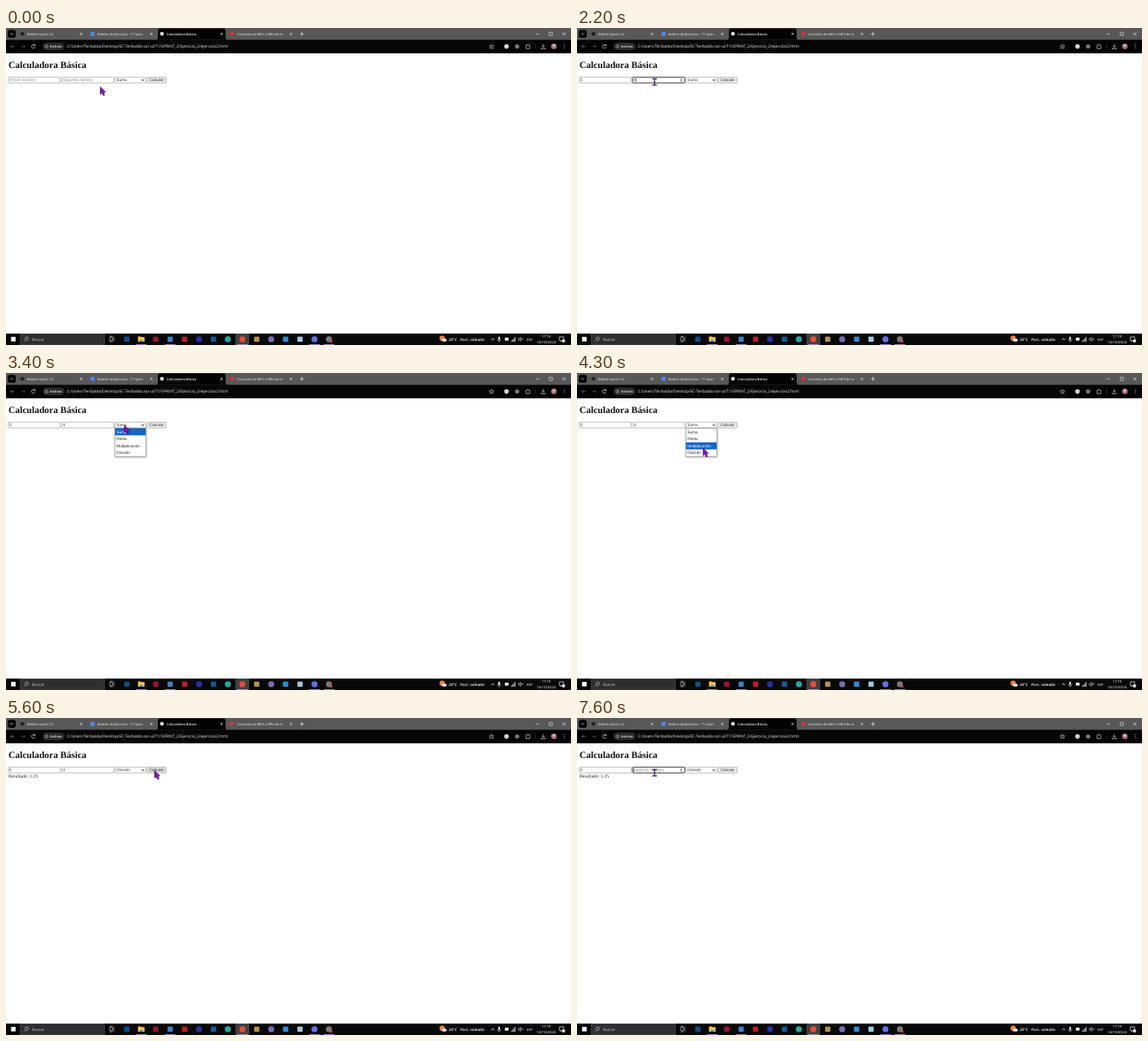
An HTML page for the animation above (8 s loop, 692 px wide and 388 px high).

```html
<!DOCTYPE html>
<html lang="es">
<head>
<meta charset="utf-8">
<title>Calculadora Básica</title>
<style>
  html, body { margin: 0; width: 100%; height: 100%; overflow: hidden; background: #fff; }
  svg { display: block; width: 692px; height: 388px; text-rendering: geometricPrecision; }
  .ui { font-family: "Open Sans", sans-serif; font-weight: 500; }
  .form { font-family: "Liberation Sans", Arial, sans-serif; font-size: 4.8px; }
  .page { font-family: "Liberation Serif", "Times New Roman", serif; }
</style>
</head>
<body>
<svg id="stage" viewBox="0 0 692 388"></svg>
<script>
const LOOP = 8000;
const rect = (x, y, w, h, fill, extra = '') =>
  `<rect x="${x}" y="${y}" width="${w}" height="${h}" fill="${fill}" ${extra}/>`;
const circle = (x, y, r, fill, extra = '') =>
  `<circle cx="${x}" cy="${y}" r="${r}" fill="${fill}" ${extra}/>`;
const line = (d, color = '#ddd', width = 0.7) =>
  `<path d="${d}" fill="none" stroke="${color}" stroke-width="${width}"/>`;
const text = (x, y, size, fill, content, extra = '') =>
  `<text x="${x}" y="${y}" font-size="${size}" fill="${fill}" ${extra}>${content}</text>`;
const cross = (x, y, r) => line(`M${x - r} ${y - r}l${2 * r} ${2 * r}m0 ${-2 * r}l${-2 * r} ${2 * r}`, '#eee');

function browserBar() {
  const tabs = [
    [26, 'Boletín Sprint 3.2', '#222', 92],
    [112, 'Boletín de Ejercicios - T1 Sprin', '#4c8bf5', 178],
    [197, 'Calculadora Básica', '#d8d8d8', 264],
    [283, 'Convierta de MKV a MP4 de m', '#e5303c', 349],
  ];
  const tabMarkup = tabs.map(([x, label, color, close], i) =>
    (i === 1 ? rect(x - 8.4, 4.7, 4.8, 4.8, color, 'rx=".6"') : circle(x - 6, 7.1, 2.4, color)) +
    text(x, 8.7, 4, '#f4f4f4', label, i === 2 ? 'font-weight="600"' : '') + cross(close, 7.2, 1.4)).join('');
  return `<g class="ui">
    ${rect(0, 0, 692, 15, '#585858')}${rect(0, 14.5, 692, 16.5, '#020202')}
    <path d="M183 14.6Q186 14.6 186 11.5V3Q186 .5 189 .5H266Q269 .5 269 3V11.5Q269 14.6 272 14.6Z" fill="#020202"/>
    ${rect(2, 2.3, 10, 9.7, '#050505', 'rx="3"')}${line('M5.4 6.3l1.6 1.6l1.6-1.6')}
    ${tabMarkup}
    ${line('M359.9 7.2h5m-2.5-2.5v5', '#eee')}${line('M649 7.2h4M665.3 5.2h3.8v3.8h-3.8z', '#eee', 0.6)}${cross(683.3, 7.2, 1.8)}
    ${line('M10.5 22.6H5.8m2.2-2.2l-2.2 2.2l2.2 2.2', '#777')}${line('M18.5 22.6h4.7m-2.2-2.2l2.2 2.2l-2.2 2.2', '#555')}
    ${line('M35.4 21.3a2.2 2.2 0 1 0 .2 2M35.7 19.8v1.8h-1.8')}
    ${rect(42, 16.6, 561, 12, '#060606', 'rx="6"')}${rect(45, 18, 26.5, 9.2, '#2b2b2b', 'rx="4.6"')}
    ${circle(49.6, 22.6, 1.8, 'none', 'stroke="#ddd" stroke-width=".5"')}${line('M49.6 22.2v1.3M49.6 21.3v.4', '#ddd', 0.5)}
    ${text(53.7, 24.1, 4.1, '#f4f4f4', 'Archivo', 'font-weight="600"')}
    ${text(74.4, 24.3, 4.86, '#f4f4f4', 'C:/Users/Teribaldo/Desktop/EC-Teribaldo.sor-ul/T1/SPRINT_2/Ejercicio_2/ejercicio2.html')}
    ${line('M594.6 19.9l.8 1.9 2 .1-1.5 1.3.5 2-1.8-1.1-1.8 1.1.5-2-1.5-1.3 2-.1z', '#ddd', 0.6)}
    ${circle(613, 22.6, 2.8, '#d2d2d2')}${circle(626, 22.6, 2.7, '#777')}
    ${line('M637 21h1.2a1 1 0 0 1 2 0h1.2v1.4a1 1 0 0 1 0 1.8v1h-4.4z')}
    ${line('M648.5 20v5.4', '#444', 0.5)}
    ${line('M658 19.6v4m-1.7-1.6l1.7 1.7l1.7-1.7M655.5 24.2v1.2h5v-1.2')}
    ${circle(671, 22.4, 3.4, '#a8727e')}${circle(671, 21.5, 1.4, '#e6bdb8')}
    ${[20.6, 22.6, 24.6].map(y => circle(684, y, 0.5, '#ddd')).join('')}
  </g>`;
}

function taskbar() {
  const apps = [
    ['#0b4f86', 'square'], ['#f4c65a', 'folder'], ['#a01238', 'square'], ['#3b82c4', 'square'],
    ['#c01c26', 'square'], ['#2b2f9e', 'circle'], ['#125c96', 'square'], ['#25a8a0', 'circle'],
    ['#e0503c', 'circle'], ['#b99049', 'square'], ['#7a6bb0', 'circle'], ['#2d8ed8', 'square'],
    ['#9bcbe0', 'square'], ['#6470e8', 'circle'], ['#77777b', 'circle'],
  ];
  const running = [1, 3, 8, 13, 14];
  const appMarkup = apps.map(([color, shape], i) => {
    const x = 148 + i * 17.68;
    const icon = shape === 'circle' ? circle(x, 380.9, 3.7, color)
      : shape === 'folder' ? rect(x - 4, 377.4, 3.5, 2, '#d99a2a') + rect(x - 4, 378.3, 8, 5.7, color) + rect(x - 2, 381.8, 4, 2.2, '#3e91d4')
      : rect(x - 3.2, 377.7, 6.4, 6.4, color, 'rx=".8"');
    return (i === 8 ? rect(x - 8.5, 374, 17, 14, '#404040') : '') + icon +
      (running.includes(i) ? rect(x - 6.5, 387.1, 13, 0.9, '#b58fd0') : '');
  }).join('');
  return `<g class="ui">
    ${rect(0, 374, 692, 14, '#080808')}${rect(17.2, 374.3, 103.6, 13.5, '#2f2f2f', 'stroke="#5a5a5a" stroke-width=".5"')}
    ${rect(6.2, 378, 5.6, 5.6, '#f4f4f4')}
    ${circle(25.5, 380.2, 2, 'none', 'stroke="#ddd" stroke-width=".6"')}${line('M24 381.7l-2 2', '#ddd', 0.6)}
    ${text(32, 382.7, 4.8, '#ccc', 'Buscar')}
    ${line('M127 378.8h3.4v3.8H127zM132 377.8v6M126.8 377.4h3.8M126.8 384h3.8', '#ddd', 0.6)}
    ${appMarkup}${circle(398.3, 383.5, 1.6, '#e33b3b')}
    ${circle(534.2, 379.8, 3.2, '#f0803a')}${rect(533.8, 380.3, 6, 3.5, '#e6e6ea', 'rx="1.7"')}
    ${text(542.2, 382.7, 4.7, '#fff', '24°C', 'font-weight="600"')}
    ${text(556.3, 382.7, 4.6, '#fff', 'Parc. soleado', 'font-weight="600"')}
    ${line('M594.2 382l1.9-1.9l1.9 1.9', '#eee', 0.8)}
    ${rect(603, 377.7, 2, 4, '#eee', 'rx="1"')}${line('M602 381a2 2 0 0 0 4 0M604 383v1.3', '#eee', 0.6)}
    ${rect(611, 379, 4.5, 3.6, '#eee')}${line('M619.5 384v-1.5m1.3 1.5v-3m1.3 3v-4.4m1.3 4.4v-5.8', '#eee', 0.8)}
    ${line('M627.7 380h1.2l1.4-1.4v4.8l-1.4-1.4h-1.2zM631.4 379.8l2 2m0-2l-2 2', '#eee', 0.6)}
    ${text(637.5, 382.6, 4.2, '#fff', 'ESP')}
    ${text(661.5, 379.3, 4.4, '#fff', '17:19', 'text-anchor="middle"')}
    ${text(661.5, 386.2, 4.4, '#fff', '14/10/2024', 'text-anchor="middle"')}
    ${line('M677.8 378h5.2v4.5h-2.4l-1.3 1.4v-1.4h-1.5z', '#eee', 0.7)}${circle(682.8, 383, 2.1, '#ddd')}
  </g>`;
}

const OPTIONS = ['Suma', 'Resta', 'Multiplicación', 'División'];
const ROW_TOP = 67.7, ROW_HEIGHT = 8.6;
const CONTROL_TOP = 60.2, CONTROL_HEIGHT = 7;
const control = (x, w, fill, stroke = '#777', width = 0.5) =>
  rect(x, CONTROL_TOP, w, CONTROL_HEIGHT, fill, `stroke="${stroke}" stroke-width="${width}" rx=".5"`);

function field(x, value, placeholder, focused, caretX) {
  const arrows = `M${x + 58.2} 63.2l1.2-1.4l1.2 1.4zM${x + 58.2} 64.3l1.2 1.4l1.2-1.4z`;
  return control(x, 63.7, '#fff', focused ? '#101010' : '#777', focused ? 0.85 : 0.5) +
    text(x + 1.2, 65.4, 4.8, value ? '#333' : '#858585', value || placeholder) +
    (focused ? `<path d="${arrows}" fill="#333"/>` : '') +
    (caretX ? rect(caretX, 61.6, 0.45, 4.4, '#111') : '');
}

function dropdown(highlighted) {
  return rect(133.2, ROW_TOP, 38, 34.4, '#fff', 'stroke="#666" stroke-width=".5" filter="url(#shadow)"') +
    OPTIONS.map((label, i) => {
      const y = ROW_TOP + i * ROW_HEIGHT, active = i === highlighted;
      return (active ? rect(133.4, y, 37.6, ROW_HEIGHT, '#1763c6') : '') +
        text(135.2, y + 5.9, 4.8, active ? '#fff' : '#222', label);
    }).join('');
}

// Pointer stops: time, x, y
const STOPS = [
  [0, 115.5, 72], [400, 57.5, 65], [1400, 57.5, 65], [1700, 95, 66], [2400, 95, 66],
  [2600, 95, 68.5], [2800, 95, 68.5], [3100, 134, 68.4], [3300, 145, 64], [3600, 145, 64],
  [4100, 154.5, 91.5], [4300, 154.5, 92], [4600, 157, 95], [4700, 157, 95],
  [5300, 182, 64.5], [5800, 182, 64.5], [6400, 95, 67], [8000, 95, 67],
];

function pointerAt(t) {
  const next = STOPS.findIndex(stop => stop[0] > t);
  const [t0, x0, y0] = STOPS[next - 1], [t1, x1, y1] = STOPS[next];
  const p = (t - t0) / (t1 - t0), eased = p * p * (3 - 2 * p);
  return [x0 + (x1 - x0) * eased, y0 + (y1 - y0) * eased];
}

function pointer(x, y) {
  const overField = x < 132 && y > 59.8 && y < 67.5;
  const shape = overField
    ? line('M-2.8-3.8H-.6L0-3.2L.6-3.8H2.8M0-3.4V3.4M-2.8 3.9H-.6L0 3.3L.6 3.9H2.8', '#35105f', 1.3)
    : '<path d="M0 0V9L2 7.4L3.8 10.8L5.4 10L3.8 6.8L6.6 6.5Z" fill="#8512bd" stroke="#32074e" stroke-width=".6"/>';
  return `<g transform="translate(${x} ${y})">${shape}</g>`;
}

function scene(t) {
  const within = (from, to) => t >= from && t < to;
  const [x, y] = pointerAt(t);
  const first = t >= 1000 ? '5' : '';
  const second = within(2200, 7400) ? '4' : '';
  const focusSecond = within(1700, 3300) || t >= 6500;
  const caretOn = focusSecond && !within(7000, 7600);
  const highlighted = Math.max(0, Math.min(3, Math.floor((y - ROW_TOP) / ROW_HEIGHT)));
  return `<g class="form">
    ${field(2.9, first, 'Primer número', within(400, 1700), 0)}
    ${field(68.2, second, 'Segundo número', focusSecond, caretOn && (second ? 72.3 : 69.4))}
    ${control(133.4, 38, '#fff')}
    ${text(135.2, 65.4, 4.8, '#333', OPTIONS[t < 4800 ? 0 : 3])}
    ${line('M166.2 63l1.5 1.5l1.5-1.5', '#111', 1)}
    ${control(173, 23, x > 173 ? '#e2e2e2' : '#efefef')}
    ${text(175.6, 65.4, 4.8, '#222', 'Calcular')}
    ${within(3400, 4800) ? dropdown(highlighted) : ''}
  </g>
  ${t >= 5500 ? text(2.9, 72.8, 5.77, '#222', 'Resultado: 1.25', 'class="page"') : ''}
  ${pointer(x, y)}`;
}

const stage = document.getElementById('stage');
stage.innerHTML = `
  <defs><filter id="shadow" x="-20%" y="-20%" width="140%" height="140%">
    <feDropShadow dx=".4" dy=".8" stdDeviation=".8" flood-opacity=".35"/></filter></defs>
  ${rect(0, 0, 692, 388, '#fff')}${browserBar()}${taskbar()}
  ${text(2.9, 49, 11.53, '#111', 'Calculadora Básica', 'class="page" font-weight="bold"')}
  <g id="scene"></g>`;
const live = document.getElementById('scene');

let shown = -1;
function tick() {
  const t = Math.floor(performance.now() % LOOP / 100) * 100;
  if (t !== shown) live.innerHTML = scene(shown = t);
  requestAnimationFrame(tick);
}
tick();
</script>
</body>
</html>
```
